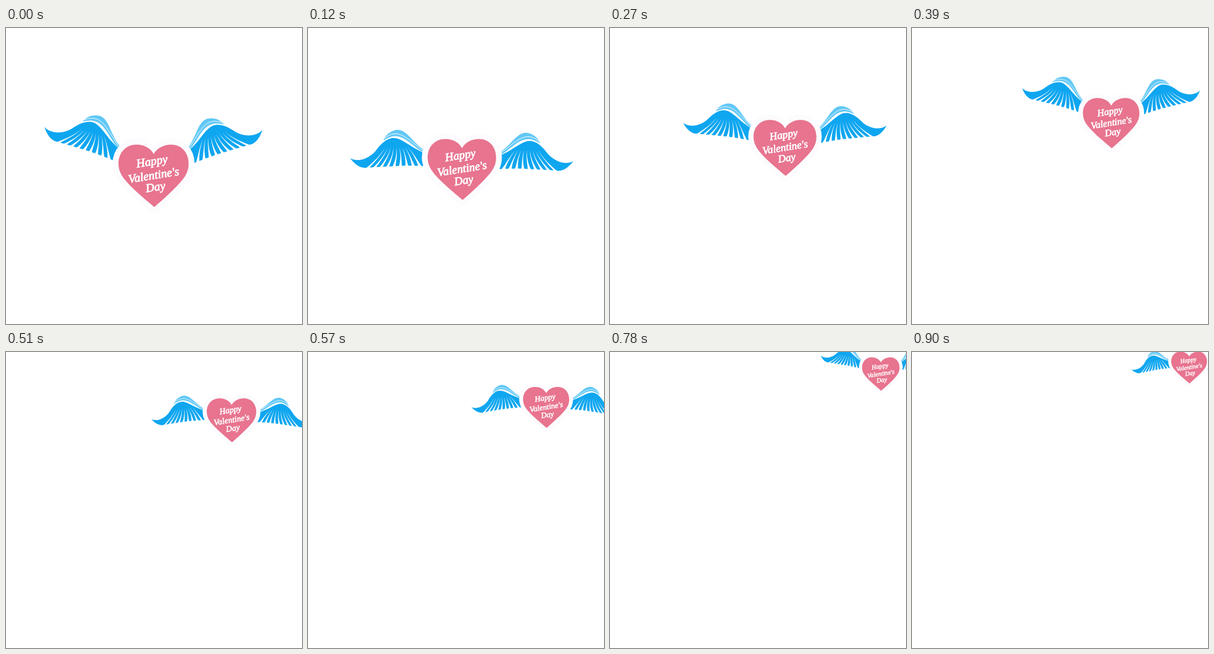
An HTML page that plays this animation: 500 px wide and 500 px high, repeating every 930 ms.

```html
<!DOCTYPE html>
<html lang="en">
<head>
<meta charset="utf-8">
<title>Happy Valentine's Day</title>
<style>
  html, body { margin: 0; width: 100%; height: 100%; overflow: hidden; background: #fff; }
  svg { display: block; width: 100vw; height: 100vh; }
  text {
    font: italic 20px "Liberation Serif", "Times New Roman", serif;
    text-anchor: middle;
    text-rendering: geometricPrecision;
    fill: #fff;
    stroke: #fff;
    stroke-width: .85;
    stroke-linejoin: round;
  }
  .main { fill: #0fa6f0; }
  .light { fill: #62c8f6; }
  .line { fill: none; stroke: #fff; stroke-width: .9; }
  .heart {
    fill: #e8748f;
    stroke: #fcfcff;
    stroke-width: 20;
    stroke-linejoin: round;
    paint-order: stroke;
  }
</style>
</head>
<body>
<svg viewBox="0 0 500 500">
  <g id="card">
    <g id="wing">
      <g id="flap">
        <path class="light" d="M130 157 C137 149 145 147 153 147 C176 148 174 178 194 201 L190 202 C173 185 168 157 144 155.500 Q136 155.500 130 157Z"/>
        <path class="line" d="M133 154 C162 145 168 165 190 199"/>
        <path class="main" d="M65.500 166 C74 176 92 179 110 170 C124 161 133 157 144 158 C161 160 168 184 192 204 L190 227 Q165 216 145 209 Q120 201 86 191 C76 189 69 178 65.500 166Z"/>
        <path id="slits" fill="#fff"/>
      </g>
    </g>
    <use href="#wing" transform="matrix(-1 0 0 1 498 5)"/>
    <path class="heart" d="M250.500 302.500 C237 291 214 272 204 260 C195 250 190 241 190 229 C190 210 203 197 220.500 197 C235 197 245 204 249.500 213 C254 204 265 197 279 197 C296 197 308.500 210 308.500 229 C308.500 241 304 250 295 260 C285 272 264 291 250.500 302.500Z"/>
    <text transform="translate(247.500 231.500) rotate(-9)">Happy</text>
    <text transform="translate(250.500 255) rotate(-9)">Valentine's</text>
    <text transform="translate(253.500 275) rotate(-9)">Day</text>
  </g>
</svg>
<script>
  const LOOP = 930, STEP = 30, FLIGHT = 900;
  const $ = id => document.getElementById(id);
  const card = $('card'), flap = $('flap');
  const cosDeg = a => Math.cos(a * Math.PI / 180);

  // Curved gap between two feathers, flared at the bottom to round their tips
  function slit(x) {
    const y = 191 + (x - 80) * .33;
    const dx = 160 - x, dy = 152 - y;
    const at = (f, bend, side) => `${x + dx * f + bend + side} ${y + dy * f + bend + side * .3}`;
    const edge = side => [at(.12, 1, side), at(.35, 3, side)];
    const [l1, l2] = edge(-.7), [r1, r2] = edge(.7);
    return `M${at(-.05, 0, -4)} C${l1} ${l2} ${at(.58, 0, 0)} C${r2} ${r1} ${at(-.05, 0, 4)}Z`;
  }
  $('slits').setAttribute('d',
    Array.from({ length: 9 }, (_, i) => slit(86 + i * 11)).join(''));

  function draw(t) {
    const u = t / FLIGHT;
    const e = .94 * (1 - cosDeg(180 * u)) / 2 + .06 * u;
    card.setAttribute('transform',
      `translate(${251 + 218 * e} ${302 - 249 * e}) scale(${1 - .49 * e}) translate(-251 -302)`);

    // One wing beat lasts 360 ms, slightly uneven
    const phase = t + 5 + 10 * cosDeg(t + 30);
    const k = (1 - cosDeg(phase)) / 2;
    flap.setAttribute('transform',
      `translate(${-4 * k} 0) rotate(${-28 * k} 243 217)`);
  }

  function tick() {
    const t = performance.now() % LOOP;
    draw(Math.floor(t / STEP) * STEP);
    requestAnimationFrame(tick);
  }
  tick();
</script>
</body>
</html>
```
